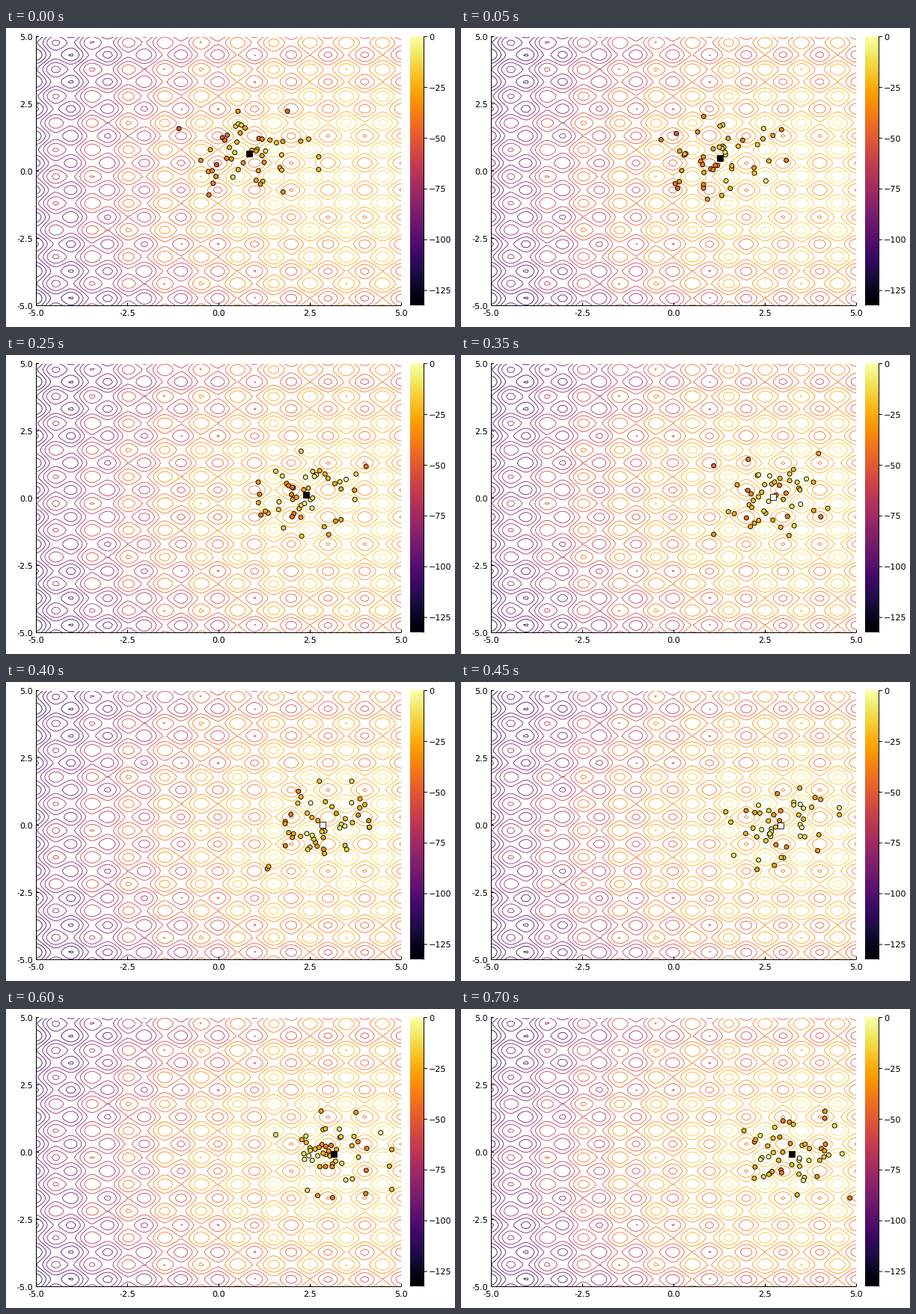
Write a matplotlib script that moves like this. It is 600x400 px and loops after 750 ms.

```python
import numpy as np
import matplotlib.pyplot as plt
from matplotlib.animation import FuncAnimation

W, H, DPI = 600, 400, 100
PX = 72 / DPI                      # one pixel in points
LEFT, RIGHT, TOP, BOTTOM = 40, 528, 11.5, 371.5
BAR_LEFT, BAR_RIGHT = 540, 558
FRAMES, INTERVAL = 15, 50
POPULATION = 50
FONT = dict(family="DejaVu Sans", size=8, color="black")

plt.rcParams["text.hinting"] = "none"


def score(x, y):
    """Negated Rastrigin function with its peak at (3.5, -0.2)."""
    u, v = x - 3.5, y + 0.2
    waves = np.cos(2 * np.pi * u) + np.cos(2 * np.pi * v)
    return -(20 + u**2 + v**2 - 10 * waves)


def search_mean(i):
    """The mean eases exponentially towards the peak."""
    return 3.45 - 2.62 * np.exp(-i / 5.5), -0.1 + 0.76 * np.exp(-i / 4)


def generation(i):
    """Normal samples around the mean, narrowing along x."""
    rng = np.random.default_rng(40 + i)
    z = rng.standard_normal((POPULATION, 2))
    z = np.clip((z - z.mean(axis=0)) / z.std(axis=0), -2.2, 2.2)
    spread = 0.72 + 0.15 * np.exp(-i / 3), 0.74
    return (z * spread + search_mean(i)).T


def to_px(x, y):
    return (LEFT + (x + 5) * (RIGHT - LEFT) / 10,
            BOTTOM - (y + 5) * (BOTTOM - TOP) / 10)


fig = plt.figure(figsize=(W / DPI, H / DPI), dpi=DPI, facecolor="white")

# Contour plot
ax = fig.add_axes([LEFT / W, 1 - BOTTOM / H,
                   (RIGHT - LEFT) / W, (BOTTOM - TOP) / H])
ax.set(xlim=(-5, 5), ylim=(-5, 5))
ax.axis("off")

grid = np.linspace(-5, 5, 101)
gx, gy = np.meshgrid(grid, grid)
heights = score(gx, gy)
low, high = heights.min(), heights.max()
levels = np.linspace(low, high, 17)[1:-1]
ticks = np.arange(-5, 5.1, 2.5)

for t in ticks:
    for rule in (ax.axvline, ax.axhline):
        rule(t, color="black", alpha=0.1, lw=0.6 * PX, zorder=0, snap=False)
ax.contour(gx, gy, heights, levels=levels, cmap="inferno", vmin=low,
           vmax=high, linewidths=0.8 * PX, zorder=1)

dots = ax.scatter([], [], s=(6 * PX)**2, cmap="inferno", c=[], vmin=low,
                  vmax=high, edgecolors="black", linewidths=0.9 * PX, zorder=3)
mean, = ax.plot([], [], "s", ms=7.5 * PX, mec="black", mew=0.8 * PX, zorder=4)

# Axis lines, labels and colour bar, in pixels
page = fig.add_axes([0, 0, 1, 1], facecolor="none")
page.imshow(np.linspace(1, 0, 256)[:, None], cmap="inferno", aspect="auto",
            extent=(BAR_LEFT, BAR_RIGHT, BOTTOM, TOP),
            interpolation="bilinear")
page.set(xlim=(0, W), ylim=(H, 0))
page.axis("off")


def line(x0, y0, x1, y1):
    page.plot([x0, x1], [y0, y1], color="black", lw=PX, snap=False,
              solid_capstyle="butt")


def label(x, y, text, ha):
    page.text(x, y + 4, text, ha=ha, va="baseline", **FONT)


line(LEFT + 0.5, TOP, LEFT + 0.5, BOTTOM)
line(LEFT, BOTTOM, RIGHT, BOTTOM)
for t in ticks:
    px, py = to_px(t, t)
    line(px + 0.5, BOTTOM, px + 0.5, BOTTOM - 4)
    line(LEFT, py, LEFT + 4, py)
    label(px, 381, f"{t:.1f}", "center")
    label(36, py, f"{t:.1f}", "right")

line(BAR_RIGHT + 0.5, TOP, BAR_RIGHT + 0.5, BOTTOM)
for v in range(0, -126, -25):
    py = TOP + (high - v) / (high - low) * (BOTTOM - TOP)
    line(BAR_RIGHT, py, BAR_RIGHT + 5, py)
    label(565, py, str(v).replace("-", "\u2212"), "left")


def draw(i):
    x, y = generation(i)
    dots.set_offsets(np.column_stack([x, y]))
    dots.set_array(score(x, y))
    mx, my = search_mean(i)
    mean.set_data([mx], [my])
    mean.set_markerfacecolor("white" if 7 <= i <= 11 else "black")
    return dots, mean


anim = FuncAnimation(fig, draw, frames=FRAMES, interval=INTERVAL,
                     init_func=lambda: draw(0), repeat=True, repeat_delay=0)
plt.show()
```
